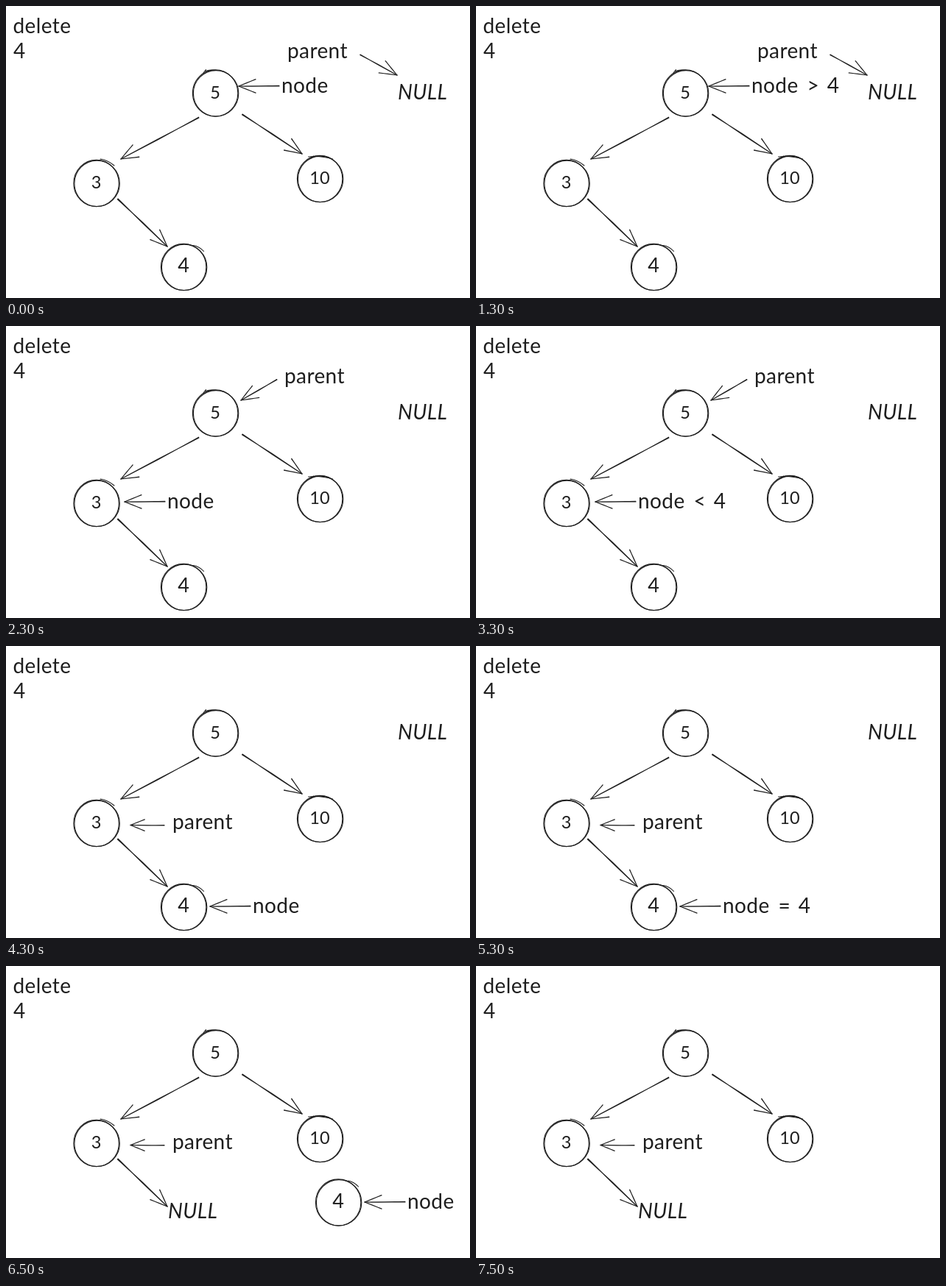
These frames come from a looping animation (630x397 px, 8500 ms). An HTML page:

```html
<!DOCTYPE html>
<html lang="en">
<head>
<meta charset="utf-8">
<title>Deleting a leaf from a search tree</title>
<style>
html, body { margin: 0; width: 100%; height: 100%; overflow: hidden; background: #fff; }
svg { display: block; width: 630px; height: 397px; }
path, ellipse { fill: none; stroke: #1e1e1e; stroke-width: 1.1; stroke-linecap: round; }
text { fill: #1e1e1e; font: 28px Lato, "Open Sans", sans-serif; letter-spacing: .4px; white-space: pre; }
.value { font-size: 23.5px; letter-spacing: 0; text-anchor: middle; }
.leaf { font-size: 27px; }
.null { font-style: italic; }
.test { word-spacing: 3px; }
</style>
</head>
<body>
<svg id="stage" viewBox="0 0 630 397"></svg>
<script>
const LOOP = 8500;
const stage = document.getElementById('stage');

function add(parent, tag, attrs = {}, content = '') {
  const el = document.createElementNS('http://www.w3.org/2000/svg', tag);
  for (const [key, value] of Object.entries(attrs)) el.setAttribute(key, value);
  el.textContent = content;
  return parent.appendChild(el);
}

// A group that is visible only between two times of the loop.
function scene(from = 0, to = LOOP) {
  const group = add(stage, 'g');
  if (from === 0 && to === LOOP) return group;
  const steps = [[0, from === 0], [from, true], [to, false], [LOOP, to === LOOP]]
    .filter(([time], i) => i % 3 === 0 || (time > 0 && time < LOOP));
  group.animate(
    steps.map(([time, on]) => ({ offset: time / LOOP, opacity: +on, easing: 'step-end' })),
    { duration: LOOP, iterations: Infinity });
  return group;
}

const label = (parent, x, y, content, style = '') =>
  add(parent, 'text', { x, y, class: style }, content);

// Two nearly coincident strokes, like a quick pen sketch.
function stroke(parent, x1, y1, x2, y2) {
  const length = Math.hypot(x2 - x1, y2 - y1);
  const nx = (y1 - y2) / length, ny = (x2 - x1) / length;
  const bend = Math.min(1, length / 90);
  const mx = (x1 + x2) / 2, my = (y1 + y2) / 2;
  add(parent, 'path', { d: `M${x1} ${y1}Q${mx + nx * bend} ${my + ny * bend} ${x2} ${y2}
    M${x1 + nx * bend} ${y1 + ny * bend}Q${mx - nx * bend} ${my - ny * bend} ${x2} ${y2}` });
}

function arrow(parent, x1, y1, x2, y2) {
  stroke(parent, x1, y1, x2, y2);
  const back = Math.atan2(y1 - y2, x1 - x2);
  const size = Math.min(25, Math.hypot(x1 - x2, y1 - y2) * .45);
  for (const turn of [-.38, .38]) {
    stroke(parent, x2 + size * Math.cos(back + turn), y2 + size * Math.sin(back + turn), x2, y2);
  }
}

function node(parent, cx, cy, value, tail, style = '') {
  add(parent, 'ellipse', { cx: cx - .4, cy, rx: 30.7, ry: 31.6 });
  add(parent, 'ellipse', { cx: cx + .6, cy: cy + .3, rx: 30.7, ry: 31.2 });
  add(parent, 'path', { d: tail, transform: `translate(${cx} ${cy})` });
  label(parent, cx - .5, cy + 7, value, 'value ' + style);
}

function nodePointer(from, to, x, y) {
  const group = scene(from, to);
  arrow(group, x + 55, y, x, y);
  label(group, x + 58, y + 9, 'node');
}

function comparison(from, to, x, y, content) {
  label(scene(from, to), x + 133.5, y + 9, content, 'test');
}

function parentPointer(from, to, textX, textY, line) {
  const group = scene(from, to);
  arrow(group, ...line);
  label(group, textX, textY, 'parent');
}

const leafTail = 'M13 -29.5Q21 -28 27 -21.5';
const tree = scene();
label(tree, 9.5, 36.5, 'delete');
label(tree, 10, 70.5, '4');
node(tree, 284.5, 118.5, '5', 'M-17 -27L-13 -32M-14 -30Q-6 -32 2 -31');
node(tree, 123, 241, '3', 'M5 -33Q16 -31 24 -24');
node(tree, 426.5, 235, '10', 'M-16 -30Q0 -32 17 -27M-12 -28L-9 -31');
arrow(tree, 262, 152, 156, 208);
arrow(tree, 321, 147, 402, 201);
arrow(tree, 152, 262, 219, 327);

parentPointer(0, 2300, 382, 71, [481, 66, 531, 94]);
parentPointer(2300, 4300, 378, 78, [368, 73, 319, 101]);
parentPointer(4300, LOOP, 226, 249, [215, 244, 169, 243.5]);

nodePointer(0, 2300, 316, 109);
comparison(1300, 2300, 316, 109, '> 4');
nodePointer(2300, 3300, 161, 239);
nodePointer(3300, 4300, 162, 239);
comparison(3300, 4300, 162, 239, '< 4');
nodePointer(4300, 6500, 277, 354);
comparison(5300, 6500, 277, 354, '= 4');
nodePointer(6500, 7500, 487, 321);

label(scene(0, 6500), 532, 127, 'NULL', 'null');
label(scene(6500, LOOP), 220, 342.5, 'NULL', 'null');
node(scene(0, 6500), 241.5, 355, '4', leafTail, 'leaf');
node(scene(6500, 7500), 451.5, 321.5, '4', leafTail, 'leaf');
</script>
</body>
</html>
```
